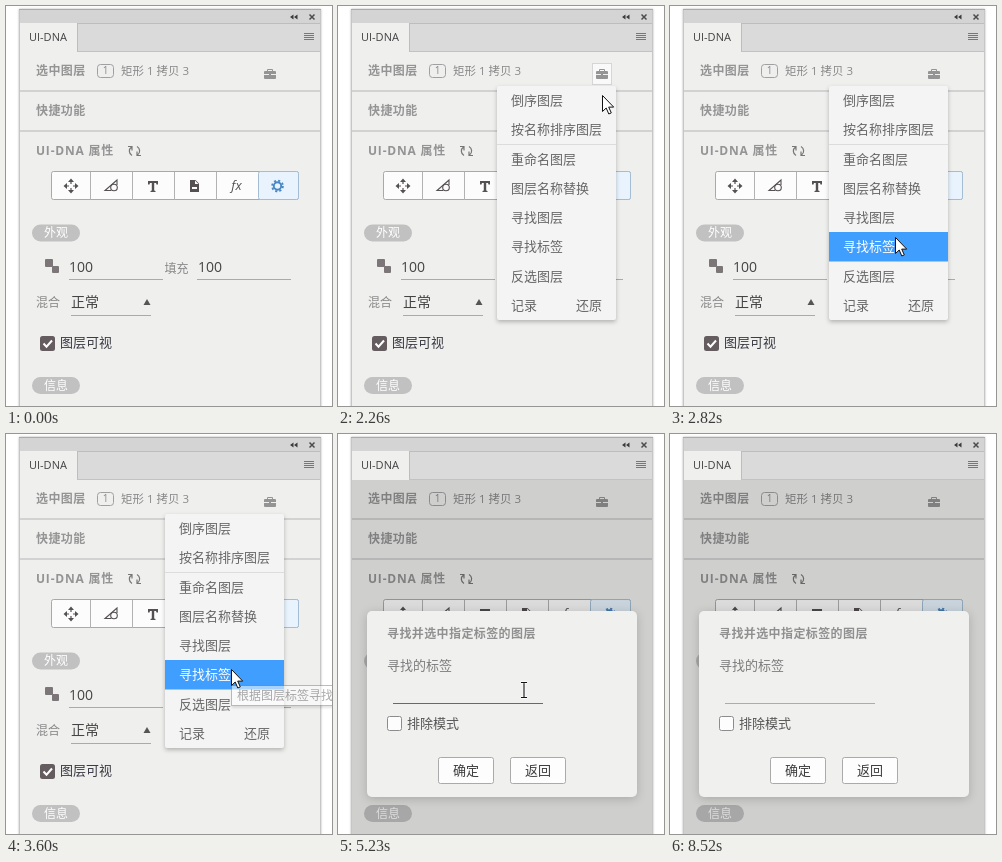
Write an HTML page that moves like this. It is 326 px wide and 400 px high and loops after 8640 ms.

```html
<!DOCTYPE html>
<html lang="zh-CN">
<head>
<meta charset="utf-8">
<style>
  html, body { margin: 0; width: 100%; height: 100%; overflow: hidden; background: #fff; }
  svg { display: block; }
  text { font-family: 'Open Sans', 'Noto Sans CJK SC', 'Noto Sans CJK', sans-serif; white-space: pre; }
  .b { font-weight: bold; letter-spacing: .4px; }
  .mid { text-anchor: middle; }
  #panel { filter: drop-shadow(0 0 1px rgba(0,0,0,.3)); }
  #menu { filter: drop-shadow(0 2px 2px rgba(0,0,0,.25)); }
  #dialog { filter: drop-shadow(0 2px 5px rgba(0,0,0,.18)); }
  #tip { filter: drop-shadow(1px 2px 1px rgba(0,0,0,.2)); }
</style>
</head>
<body>
<svg id="stage" width="326" height="400" viewBox="0 0 326 400"></svg>
<script>
const LOOP = 8640;
const BG = '#efefee';

// Text is placed by its left (or middle) x and the vertical centre of its glyphs.
const text = (x, cy, size, fill, str, attrs = '') =>
  `<text x="${x}" y="${cy + size * .34}" font-size="${size}" fill="${fill}" ${attrs}>${str}</text>`;
const rect = (x, y, w, h, fill, attrs = '') =>
  `<rect x="${x}" y="${y}" width="${w}" height="${h}" fill="${fill}" ${attrs}/>`;
const path = (d, fill, attrs = '') => `<path d="${d}" fill="${fill}" ${attrs}/>`;
const line = (d, color, w = 1, attrs = '') =>
  path(d, 'none', `stroke="${color}" stroke-width="${w}" ${attrs}`);
const pill = (y, str) =>
  rect(26, y, 48, 17, '#c1c1c1', 'rx="8.5"') + text(50, y + 8.5, 12, '#fff', str, 'class="mid"');
const button = (x, str) =>
  rect(x + .5, 323.5, 55, 26, '#fdfdfd', 'rx="2" stroke="#aaa"') +
  text(x + 28, 337, 13, '#3c3c3c', str, 'class="mid"');

const header =
  rect(13, 3, 302, 410, BG, 'id="panel"') +
  rect(13, 3, 302, 43, '#dadada') + rect(13, 3, 302, 14, '#d4d4d4') +
  rect(13, 3, 302, 1, '#aaa') + rect(13, 17, 302, 1, '#bdbdbd') +
  rect(14, 17, 57, 29, BG) + rect(71, 45, 243, 1, '#c2c2c2') + rect(71, 17, 1, 28, '#bdbdbd') +
  rect(13, 4, 1, 400, '#c6c6c6') + rect(314, 4, 1, 400, '#c6c6c6') +
  text(23, 31, 11, '#444', 'UI-DNA') +
  path('M287.500 8.500v5l-3.500-2.500zM291.500 8.500v5l-3.500-2.500z', '#3c3c3c') +
  line('M303.500 8.500l5 5m0-5l-5 5', '#4c4c4c', 1.5) +
  line('M298 27.500h10m-10 2h10m-10 2h10m-10 2h10', '#777');

const layerRow =
  text(30, 65, 12, '#949494', '选中图层', 'class="b"') +
  rect(91.5, 58.5, 16, 13, 'none', 'rx="3" stroke="#a0a0a0"') +
  text(99.5, 65, 10, '#888', '1', 'class="mid"') +
  text(115, 65.5, 11.5, '#888', '矩形 1 拷贝 3') +
  rect(254.5, 57.5, 19, 21, '#f9f9f9', 'id="hot" stroke="#d6d6d6"') +
  rect(258, 65, 12, 8, '#949494', 'rx="1"') +
  line('M261.500 65v-1.500h5v1.500', '#949494') +
  line('M258 68.500h5m2 0h5', BG) +
  rect(14, 84, 300, 2, '#d2d2d2') +
  text(30, 105, 12, '#949494', '快捷功能', 'class="b"') +
  rect(14, 124, 300, 2, '#d2d2d2') +
  text(30, 145, 12, '#949494', 'UI-DNA 属性', 'class="b" style="letter-spacing:.8px"') +
  line('M126 149.500a5 5 0 0 1-.5-8.500M122 140.500h4v4M131 140.500a5 5 0 0 1 .5 8.500M135 149.500h-4v-4', '#777', 1.2);

const dividers = [84, 126, 168, 210];
const icon = '#555152', blue = '#4887c4';
const toolbar =
  rect(45.5, 165.5, 247, 28, '#fcfcfc', 'rx="2" stroke="#a9a9a9"') +
  rect(252.5, 165.5, 40, 28, '#e8f3fd', 'rx="2" stroke="#a5bdd3"') +
  dividers.map(x => rect(x, 166, 1, 28, '#b2b2b2')).join('') +
  path('M65 172.500l3 3.500h-6zM65 187.500l3-3.500h-6zM57.500 180l3.500-3v6zM72.500 180l-3.500-3v6z', icon) +
  line('M65 175v3m0 4v3M60 180h3m4 0h3', icon, 1.2) +
  line('M105 184.500h-6l12-10.500v5', icon, 1.1) +
  `<circle cx="108" cy="181.500" r="3.300" fill="none" stroke="${icon}" stroke-width="1.100"/>` +
  path('M142 175h10v3.500h-1.500l-.5-1.500h-1.800v7.500l1.300.5v1h-5v-1l1.300-.5v-7.500h-1.800l-.5 1.500h-1.500z', icon) +
  path('M184 174h5.500l3.500 3.500v8.500h-9z', icon) +
  path('M189 174.500v3.500h3.500M186 181h5v2h-5z', '#fcfcfc') +
  text(230.5, 180, 13, icon, 'fx', 'class="mid" font-style="italic"') +
  `<g fill="none" stroke="${blue}"><circle cx="271.500" cy="180" r="3.700" stroke-width="1.900"/>
   <circle cx="271.500" cy="180" r="5.400" stroke-width="1.800" stroke-dasharray="2.120 2.120"/></g>`;

const form =
  pill(218.5, '外观') +
  rect(39, 253, 8, 8, '#7c7678', 'rx="1"') + rect(46, 260, 7, 7, '#7c7678', 'rx="1"') +
  text(63, 261, 14, '#444', '100') + rect(63, 273, 94, 1, '#aaa') +
  text(158.5, 262.5, 12, '#888', '填充') +
  text(192, 261, 14, '#444', '100') + rect(191, 273, 94, 1, '#aaa') +
  text(30, 296.5, 12, '#888', '混合') + text(65, 296, 14, '#444', '正常') +
  rect(65, 309, 80, 1, '#aaa') + path('M141 293l3.500 6h-7z', '#555') +
  rect(34, 330, 15, 15, '#655c60', 'rx="2.500"') +
  line('M37.500 337.500l3 3.200 5.500-6.200', '#fff', 2) +
  text(54, 337, 13, '#363640', '图层可视') +
  pill(371, '信息');

const rows = [['倒序图层', 95], ['按名称排序图层', 124], ['重命名图层', 154], ['图层名称替换', 183],
  ['寻找图层', 212], ['反选图层', 271], ['记录', 300]];
const menu =
  `<clipPath id="clip"><rect id="drop" x="159" y="80" width="119"/></clipPath>
   <g id="menu"><g clip-path="url(#clip)">` +
  rect(159, 80, 119, 234, '#f4f4f4', 'rx="2"') + rect(159, 138, 119, 1, '#dcdcdc') +
  rect(159, 226, 119, 29.5, '#409eff', 'id="glow"') +
  rows.map(([str, y]) => text(173, y, 13, '#666', str)).join('') +
  text(238, 300, 13, '#666', '还原') +
  text(173, 241, 13, '#666', '寻找标签', 'id="pick"') + '</g></g>';

const tip = '<g id="tip">' + rect(225.5, 251.5, 130, 20, '#fff', 'stroke="#888"') +
  text(231, 261.5, 12, '#666', '根据图层标签寻找图层') + '</g>';

const dialog =
  rect(14, 46, 300, 354, '#000', 'id="shade"') +
  '<g id="dialog">' + rect(29, 177, 270, 186, '#f0f0ef', 'rx="5"') +
  text(49, 200, 12, '#909090', '寻找并选中指定标签的图层', 'class="b"') +
  text(49, 232, 13, '#7c7c7c', '寻找的标签') +
  rect(55, 269, 150, 1, '#aaa', 'id="under"') + rect(55, 248, 1, 17, '#222', 'id="caret"') +
  rect(49.5, 282.5, 14, 14, '#fdfdfd', 'rx="2" stroke="#8c8c8c"') +
  text(69, 289.5, 13, '#555', '排除模式') +
  button(100, '确定') + button(172, '返回') + '</g>';

const beam = 'M-3-7.500h2.500l.5.500.5-.5h2.500M-3 7.500h2.500l.5-.5.5.500h2.500M0-7v14';
const pointers =
  path('M-.5.500v16l3.700-3.500 2.600 6 2.500-1.100-2.600-5.800h5z', '#fff',
    'id="arrow" stroke="#111" stroke-linejoin="round"') +
  '<g id="beam">' + line(beam, '#fff', 2.6) + line(beam, '#111', 1.1) + '</g>';

const $ = id => document.getElementById(id);
$('stage').innerHTML = header + layerRow + toolbar + form + menu + tip + dialog + pointers;

// Every track is a list of [time, value...]; each value holds until the next time.
const at = (track, t) => track.reduce((now, key) => key[0] <= t ? key : now);
const ease = k => k * k * (3 - 2 * k);
const glide = (t0, t1, n, [x0, y0], [x1, y1], first = 0) => Array.from({ length: n }, (_, i) => {
  const k = ease((i + first) / (n - 1 + first));
  return [t0 + (t1 - t0) * i / (n - 1), x0 + (x1 - x0) * k, y0 + (y1 - y0) * k, 'arrow'];
});

const pointer = [
  [0, 0, 0, ''],
  ...glide(290, 970, 7, [286, 347], [269, 73]),
  ...glide(2160, 2600, 5, [269, 73], [226, 231], 1),
  [3160, 226, 235, 'arrow'],
  [4150, 200, 244, 'arrow'], [4250, 186, 255.5, 'beam'],
  [6230, 186, 258, 'beam'], [6340, 187, 266, 'arrow'], [6450, 190, 274, 'arrow'],
  [6660, 198, 288, 'arrow'], [6770, 205, 303, 'arrow'], [6880, 190, 316, 'arrow'],
  [6990, 170, 322, 'arrow'], [7100, 156, 324, 'arrow'], [7210, 150, 327, 'arrow'],
  [7330, 147, 328, 'arrow'], [7440, 145, 329, 'arrow'], [7650, 114, 331, 'arrow'],
  [7870, 182, 354, 'arrow'], [7990, 0, 0, ''],
];
const tracks = {
  hot: [[0, 0], [970, 1], [2270, 0]],
  menu: [[0, 0], [1610, 1], [3700, .4], [3820, 0]],
  glow: [[0, 0], [2600, .45], [2710, .8], [2820, 1]],
  tip: [[0, 0], [3160, .5], [3260, 1], [3600, .55], [3700, 0]],
  shade: [[0, 0], [3700, .08], [3820, .135]],
  dialog: [[0, 0], [3700, .6], [3820, 1]],
  caret: [[0, 0], [4800, 1], [5230, 0], [5680, 1], [6230, 0], [6660, 1], [7210, 0], [7650, 1], [8210, 0]],
};
const dropHeight = [[0, 0], [1610, 17], [1720, 150], [1830, 234]];
const underGrey = [[0, 172], [4700, 140], [4800, 105], [8520, 172]];
const grey = v => `rgb(${v},${v},${v})`;

function draw() {
  const t = performance.now() % LOOP;
  for (const id in tracks) $(id).setAttribute('opacity', at(tracks[id], t)[1]);
  $('drop').setAttribute('height', at(dropHeight, t)[1]);
  $('pick').setAttribute('fill', grey(102 + 153 * at(tracks.glow, t)[1]));
  $('under').setAttribute('fill', grey(at(underGrey, t)[1]));
  const [, x, y, kind] = at(pointer, t);
  for (const id of ['arrow', 'beam']) {
    $(id).setAttribute('visibility', id === kind ? 'visible' : 'hidden');
    $(id).setAttribute('transform', `translate(${Math.round(x)} ${Math.round(y)})`);
  }
  requestAnimationFrame(draw);
}
draw();
</script>
</body>
</html>
```
